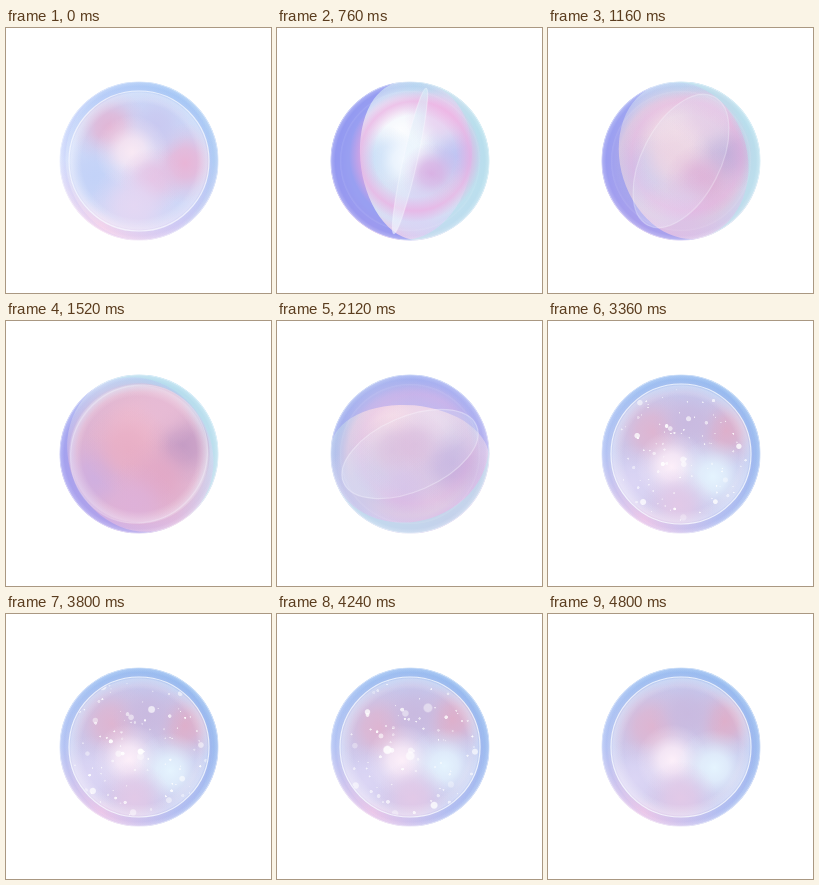
Recreate the animation shown at these times as an HTML page with a canvas. Size 265 by 265 pixels, loop 4.84 s.

```html
<!DOCTYPE html>
<html lang="en">
<head>
<meta charset="utf-8">
<title>Glass orb</title>
<style>
  html, body { margin: 0; width: 100%; height: 100%; overflow: hidden; background: #fff; }
  canvas { display: block; width: 265px; height: 265px; }
</style>
</head>
<body>
<canvas id="stage" width="265" height="265"></canvas>
<script>
const LOOP = 4840, STEP = 40, C = 133, R = 79.5, TAU = Math.PI * 2;
const ctx = document.getElementById('stage').getContext('2d');

// rim: colours clockwise from the right; blobs: x, y, radius, colour;
// violet / cyan: shell turn, width, alpha; lens: turn, width, fill, line; halo: pink ring alpha
const calm = {
  rim: ['#a9c6f5', '#cfc6f3', '#fad3ea', '#dce6fd', '#b3cbf8', '#9fc4f5'],
  core: '#cfd8f7',
  blobs: [
    [104, 100, 34, '#e3b3d3'], [179, 135, 35, '#eab3d5'], [88, 148, 36, '#c2d2f8'],
    [150, 98, 30, '#c9c8f0'], [126, 124, 32, '#fbeaf4'], [146, 152, 28, '#e7c0e2'],
    [128, 178, 38, '#e5d7f3']
  ],
  violet: [-0.2, 0.92, 0.1], cyan: [3.1, 0.92, 0.1], lens: [0, 1, 0, 0.75], halo: 0
};
const split = {
  rim: ['#b5e1ed', '#c8d4f5', '#f7b2de', '#a5a6f2', '#aebcf1', '#aadcec'],
  core: '#d6e3f5',
  blobs: [
    [124, 104, 46, '#ffffff'], [180, 128, 32, '#bfc2f2'], [108, 130, 28, '#c5dcf6'],
    [166, 86, 34, '#ecd0f0'], [128, 132, 30, '#f4f9ff'], [154, 146, 27, '#d9afe3'],
    [140, 184, 36, '#d9d4f5']
  ],
  violet: [-0.14, 0.62, 0.85], cyan: [3.35, 0.77, 0.65], lens: [0.22, 0.1, 0.6, 0.35], halo: 0.8
};
const blush = {
  rim: ['#c6e3f8', '#dfbce1', '#cdb0ea', '#b2b0f3', '#c0d2f4', '#a8d8f6'],
  core: '#e2b3cf',
  blobs: [
    [134, 108, 46, '#f0bdd0'], [177, 125, 34, '#c49bc4'], [88, 158, 38, '#cfafe0'],
    [158, 86, 35, '#e7bbd5'], [122, 128, 38, '#e8aec5'], [152, 158, 36, '#e2a8c6'],
    [128, 184, 36, '#deb1d9']
  ],
  violet: [-0.45, 0.88, 0.5], cyan: [2.5, 0.9, 0.75], lens: [0.7, 0.96, 0, 0.25], halo: 0
};
const cross = {
  rim: ['#f3b8e6', '#d2b2f3', '#d5e4f7', '#a8cfe8', '#a3cbe9', '#9ea6ee'],
  core: '#dce2f7',
  blobs: [
    [103, 100, 42, '#ffffff'], [174, 156, 42, '#c5bdf3'], [94, 166, 37, '#c8e0f1'],
    [154, 100, 38, '#f5f1ff'], [110, 130, 24, '#ccc9f2'], [126, 92, 22, '#d5caf0'],
    [126, 153, 27, '#cac8f2']
  ],
  violet: [3.59, 0.37, 0.4], cyan: [6.15, 0.8, 0.5], lens: [1.59, 0.14, 0.5, 0.45], halo: 0.4
};
const swirl = {
  rim: ['#91b3f0', '#aebcf2', '#f0c6e8', '#b4c6f5', '#98bdf2', '#8fb8f0'],
  core: '#cbc9ec',
  blobs: [
    [104, 112, 38, '#dfb4d0'], [177, 108, 32, '#dfaec9'], [86, 165, 34, '#dcd6f5'],
    [140, 100, 32, '#c9b9df'], [124, 146, 31, '#fff1fa'], [166, 154, 33, '#e6f6ff'],
    [132, 184, 32, '#e3c9e7']
  ],
  violet: [6.08, 0.92, 0.08], cyan: [9.38, 0.92, 0.1], lens: [3.14, 1, 0, 0.8], halo: 0
};
const poses = [[0, calm], [760, split], [1520, blush], [2680, cross], [3240, swirl], [LOOP, swirl]];

const rgb = h => [1, 3, 5].map(i => parseInt(h.slice(i, i + 2), 16));
const rgba = (c, a = 1) => `rgba(${c.map(Math.round).join()},${a})`;
const clamp = x => Math.max(0, Math.min(1, x));
const smooth = x => { x = clamp(x); return x * x * (3 - 2 * x); };

function mix(a, b, u) {
  if (typeof a === 'number') return a + (b - a) * u;
  if (typeof a === 'string') return mix(rgb(a), rgb(b), u);
  if (Array.isArray(a)) return a.map((v, i) => mix(v, b[i], u));
  return Object.fromEntries(Object.keys(a).map(k => [k, mix(a[k], b[k], u)]));
}

function poseAt(t) {
  const i = poses.findIndex(p => p[0] > t);
  const [t0, a] = poses[i - 1], [t1, b] = poses[i];
  const u = (t - t0) / (t1 - t0);
  return mix(a, b, (u + smooth(u)) / 2);
}

function radial(x, y, r, stops) {
  const g = ctx.createRadialGradient(x, y, 0, x, y, r);
  stops.forEach(([at, c, a]) => g.addColorStop(at, rgba(c, a)));
  ctx.fillStyle = g;
  ctx.beginPath();
  ctx.arc(x, y, r, 0, TAU);
  ctx.fill();
}

function clipDisc(r) {
  ctx.beginPath();
  ctx.arc(0, 0, r, 0, TAU);
  ctx.clip();
}

// Half of the sphere's outline, closed by the near edge of a tilted disc.
function shell([turn, width, alpha], color) {
  ctx.save();
  ctx.rotate(turn);
  ctx.beginPath();
  ctx.arc(0, 0, R, Math.PI / 2, Math.PI * 1.5);
  ctx.ellipse(0, 0, Math.abs(width) * R, R, 0, -Math.PI / 2, Math.PI / 2, width > 0);
  ctx.fillStyle = rgba(color, alpha);
  ctx.fill();
  ctx.restore();
}

function lens([turn, width, fill, line]) {
  ctx.save();
  ctx.rotate(turn);
  ctx.beginPath();
  ctx.ellipse(0, 0, 70 * width, 70 + 5 * (1 - width), 0, 0, TAU);
  const g = ctx.createLinearGradient(0, -74, 0, 74);
  g.addColorStop(0, rgba([215, 240, 248], fill));
  g.addColorStop(0.5, rgba([225, 240, 250], fill * 0.35));
  g.addColorStop(1, rgba([245, 250, 255], fill));
  ctx.fillStyle = g;
  ctx.fill();
  ctx.strokeStyle = rgba([248, 250, 255], line);
  ctx.lineWidth = 1.2;
  ctx.stroke();
  ctx.restore();
}

function randomizer(seed) {
  return () => (seed = (seed * 16807) % 2147483647) / 2147483647;
}
const rand = randomizer(4127);
const dots = Array.from({ length: 95 }, () => ({
  angle: rand() * TAU,
  dist: Math.sqrt(rand()) * 66,
  size: 0.7 + 2.5 * rand() ** 3,
  grow: rand() ** 2,
  alpha: 0.5 + 0.5 * rand(),
  phase: rand() * TAU
}));

function sparkle(t) {
  const show = smooth((t - 2880) / 400) * (1 - smooth((t - 4320) / 440));
  if (!show) return;
  const p = (t - 3360) / 880;
  ctx.save();
  clipDisc(69);
  for (const d of dots) {
    const a = d.angle + 0.25 * p, r = d.dist * (1 + 0.12 * p);
    const twinkle = 0.78 + 0.22 * Math.sin(t / 170 + d.phase);
    const size = Math.max(0.5, d.size * (1 + d.grow * p));
    radial(Math.cos(a) * r, Math.sin(a) * r - 3 * p, size * 1.2, [
      [0, [255, 255, 255], show * d.alpha * twinkle],
      [0.7, [255, 255, 255], show * d.alpha * twinkle],
      [1, [255, 255, 255], 0]
    ]);
  }
  ctx.restore();
}

function draw(t) {
  const p = poseAt(t), white = [255, 255, 255];
  const facing = smooth((p.lens[1] - 0.5) * 2);
  ctx.fillStyle = '#fff';
  ctx.fillRect(0, 0, 265, 265);
  ctx.save();
  ctx.translate(C, C);
  clipDisc(R);

  const rim = ctx.createConicGradient(0, 0, 0);
  [...p.rim, p.rim[0]].forEach((c, i) => rim.addColorStop(i / 6, rgba(c)));
  ctx.fillStyle = rim;
  ctx.fillRect(-R, -R, 2 * R, 2 * R);
  radial(0, 0, R, [[0, p.core, 1], [0.78, p.core, 0.9], [0.9, p.core, 0.25], [1, p.core, 0]]);

  ctx.save();
  clipDisc(R - 9 * facing);
  if (t > 3240) ctx.rotate(0.1 * Math.sin((t - 3240) / 1600 * TAU));
  for (const [x, y, r, c] of p.blobs)
    radial(x - C, y - C, r * 1.15, [[0, c, 0.95], [0.35, c, 0.75], [0.7, c, 0.25], [1, c, 0]]);
  ctx.restore();

  shell(p.violet, [143, 148, 241]);
  shell(p.cyan, [184, 225, 237]);

  const pink = [240, 166, 222];
  radial(5, -5, 66, [[0, pink, 0], [0.62, pink, 0], [0.83, pink, 0.75 * p.halo], [1, pink, 0]]);

  // Soft light along the inside of the front disc.
  radial(0, 0, 70, [[0, white, 0], [0.82, white, 0], [0.97, white, 0.35 * facing], [1, white, 0.1]]);
  lens(p.lens);
  sparkle(t);
  radial(0, 0, R, [[0, white, 0], [0.94, white, 0], [0.985, white, 0.2], [1, white, 0.8]]);
  ctx.restore();
}

const start = performance.now();
function tick() {
  const t = (performance.now() - start) % LOOP;
  draw(Math.floor(t / STEP) * STEP);
  requestAnimationFrame(tick);
}
tick();
</script>
</body>
</html>
```
